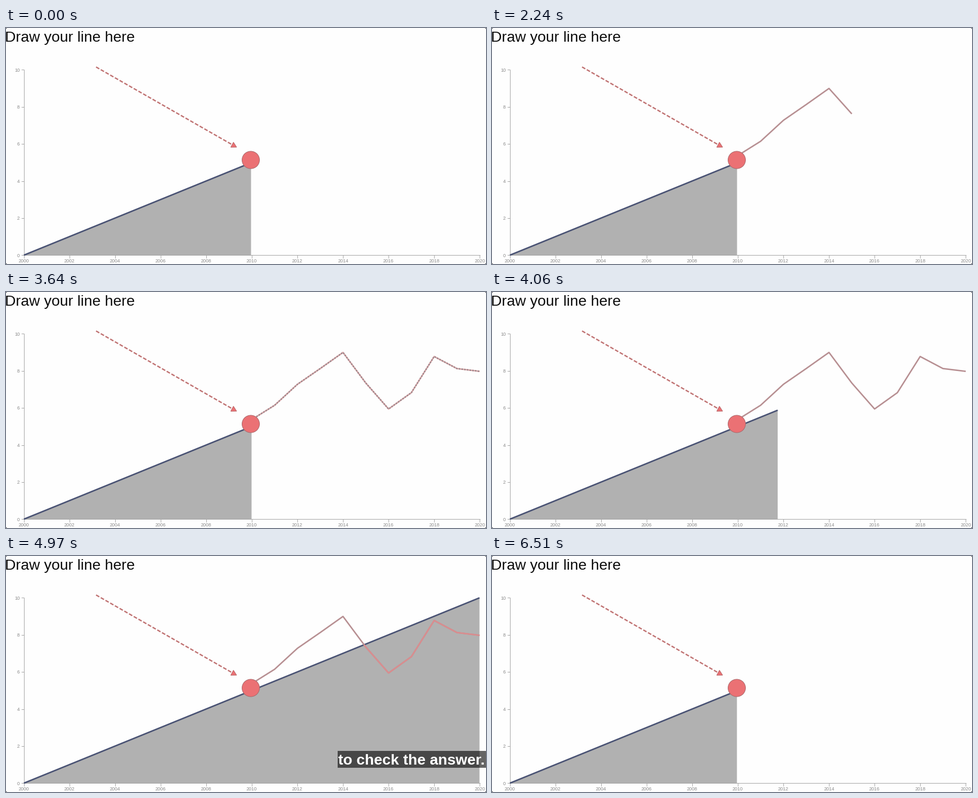
Recreate the animation shown at these times as a matplotlib script. Size 906 px wide and 448 px high, loop 6580 ms.

```python
import numpy as np
import matplotlib.pyplot as plt
from matplotlib.animation import FuncAnimation
from matplotlib.patches import Circle, Polygon, Rectangle

W, H, DPI = 906, 448, 100
STEP, FRAMES = 70, 94
PX = 72 / DPI  # points per pixel

plt.rcParams["font.family"] = "Liberation Sans"

# Timeline in ms
DOTTED = (2450, 3850)
REVEAL_START, REVEAL_TIME = 3500, 1580
CAPTION_IN = 4200
FADE_START, FADE_TIME = 6230, 280

YEARS = np.arange(2010, 2021)
GUESS = [5.38, 6.15, 7.28, 8.13, 9.0, 7.35, 5.95, 6.83, 8.78, 8.13, 7.98]
# Cursor position along the year axis
CURSOR_MS = [1050, 1540, 2380, 2940, 3500, 3640]
CURSOR_YEAR = [2010.5, 2011.99, 2016.0, 2017.96, 2019.5, 2020.5]

LEFT, FLOOR = 33.8, 431.2
EDGE_START, EDGE_END = 462.3, 894.3

AXIS = "#a3a3a3"
LABEL = "#8c8c8c"
GREY = "#b1b1b1"
NAVY = "#4a5374"
RED = "#eb7174"
GUESS_SOLID, GUESS_PALE = "#b78f92", "#dba5a7"


def px_x(year):
    return LEFT + 43.02 * (np.asarray(year) - 2000)


def px_y(value):
    return 431.5 - 35.2 * np.asarray(value)


fig = plt.figure(figsize=(W / DPI, H / DPI), dpi=DPI, facecolor="#fefefe")
ax = fig.add_axes([0, 0, 1, 1])
ax.set_xlim(0, W)
ax.set_ylim(H, 0)
ax.axis("off")


def stroke(xs, ys, color, width, z, **kw):
    kw.setdefault("solid_capstyle", "butt")
    return ax.plot(xs, ys, color=color, lw=width * PX, zorder=z, **kw)[0]


def label(x, y, text, size, color, z=2, **kw):
    return ax.text(x, y, text, fontsize=size * PX, color=color, zorder=z,
                   va="baseline", **kw)


def draw_axes():
    stroke([33.5, 33.5], [79.5, 431.5], AXIS, 1, 3)
    stroke([33.5, 894.5], [431.5, 431.5], AXIS, 1, 3)
    for value in range(0, 11, 2):
        y = float(px_y(value))
        stroke([28.5, 33.5], [y, y], AXIS, 1, 3)
        label(26, y + 3.2, str(value), 9, LABEL, ha="right")
    for year in range(2000, 2021, 2):
        x = float(px_x(year))
        stroke([x, x], [431.5, 437], AXIS, 1, 3)
        label(x, 445.3, str(year), 9, LABEL, ha="center")


def draw_arrow():
    stroke([170, 426], [74, 221], "#c07272", 2.5, 4,
           dashes=(2.8, 1.3), dash_capstyle="butt")
    ax.add_patch(Polygon([(429.3, 216.8), (435.3, 226.2), (424.2, 226.4)],
                         fc=RED, ec="#b8686a", lw=PX, zorder=4))


def draw_corners():
    for x, dx in ((0, 2), (W, -2)):
        for y, dy in ((0, 2), (H, -2)):
            ax.add_patch(Polygon([(x, y), (x + dx, y), (x, y + dy)],
                                 fc="#555555", lw=0, zorder=9))


def trend_y(x):
    return FLOOR - 352 * (x - LEFT) / 860.4


def slab(x0, x1):
    """Outline of the grey area below the trend between two x positions."""
    return [(x0, 431.5), (x0, trend_y(x0)), (x1, trend_y(x1)), (x1, 431.5)]


def draw_trend(x0, x1):
    area = ax.add_patch(Polygon(slab(x0, x1), fc=GREY, lw=0, zorder=1))
    line = stroke([x0, x1], [trend_y(x0), trend_y(x1)], NAVY, 2.8, 4)
    return area, line


draw_axes()
draw_arrow()
draw_corners()
label(-2, 26.2, "Draw your line here", 28.2, "#0c0c0c")

draw_trend(LEFT, EDGE_START)
# The revealed part starts hidden behind the handle
SEAM = EDGE_START - 6
area, trend = draw_trend(SEAM, EDGE_START)

guess = stroke([], [], GUESS_SOLID, 2.7, 5)
guess_on_grey = stroke([], [], "#d98d8f", 2.8, 5.1)
dots = stroke([], [], "#9a888c", 2.7, 5.2, dashes=(0.95, 0.95),
              dash_capstyle="butt")
ax.add_patch(Circle((462, 250.5), 16.5, fc=RED, ec="#aa686b",
                    lw=PX, zorder=6))
shade = ax.add_patch(Rectangle((626, 370), 280, 32, fc="black", lw=0,
                               zorder=7))
caption = label(627, 396.3, "to check the answer.", 28.2, "white", z=8,
                weight="bold")


def guess_points(t):
    """Each year keeps the last height the cursor had while nearest to it."""
    cursor = np.interp(t, CURSOR_MS, CURSOR_YEAR)
    years = YEARS[YEARS <= np.floor(cursor + 0.5)]
    if t < CURSOR_MS[0]:
        return [], []
    values = np.interp(np.minimum(cursor, years + 0.5), YEARS + 0.5, GUESS)
    return px_x(years), px_y(values)


def clamp(u):
    return min(max(u, 0), 1)


def cubic_in_out(u):
    return 4 * u ** 3 if u < 0.5 else 1 - 4 * (1 - u) ** 3


def update(i):
    t = i * STEP
    shown = 1 - clamp((t - FADE_START) / FADE_TIME)

    u = cubic_in_out(clamp((t - REVEAL_START) / REVEAL_TIME))
    edge = EDGE_START + (EDGE_END - EDGE_START) * u
    area.set_xy(slab(SEAM, edge))
    trend.set_data([SEAM, edge], [trend_y(SEAM), trend_y(edge)])

    xs, ys = guess_points(t)
    for line in (guess, guess_on_grey, dots):
        line.set_data(xs, ys)
    dotted = DOTTED[0] <= t < DOTTED[1]
    guess.set_color(GUESS_PALE if dotted else GUESS_SOLID)
    dots.set_visible(dotted)
    guess_on_grey.set_clip_path(area)
    guess_on_grey.set_visible(u > 0)

    for part in (area, trend, guess, guess_on_grey):
        part.set_alpha(shown)
    captioned = shown if t >= CAPTION_IN else 0
    shade.set_alpha(0.6 * captioned)
    caption.set_alpha(captioned)
    return []


anim = FuncAnimation(fig, update, frames=FRAMES, interval=STEP,
                     init_func=lambda: update(0), repeat=True,
                     repeat_delay=0, blit=False)
plt.show()
```
